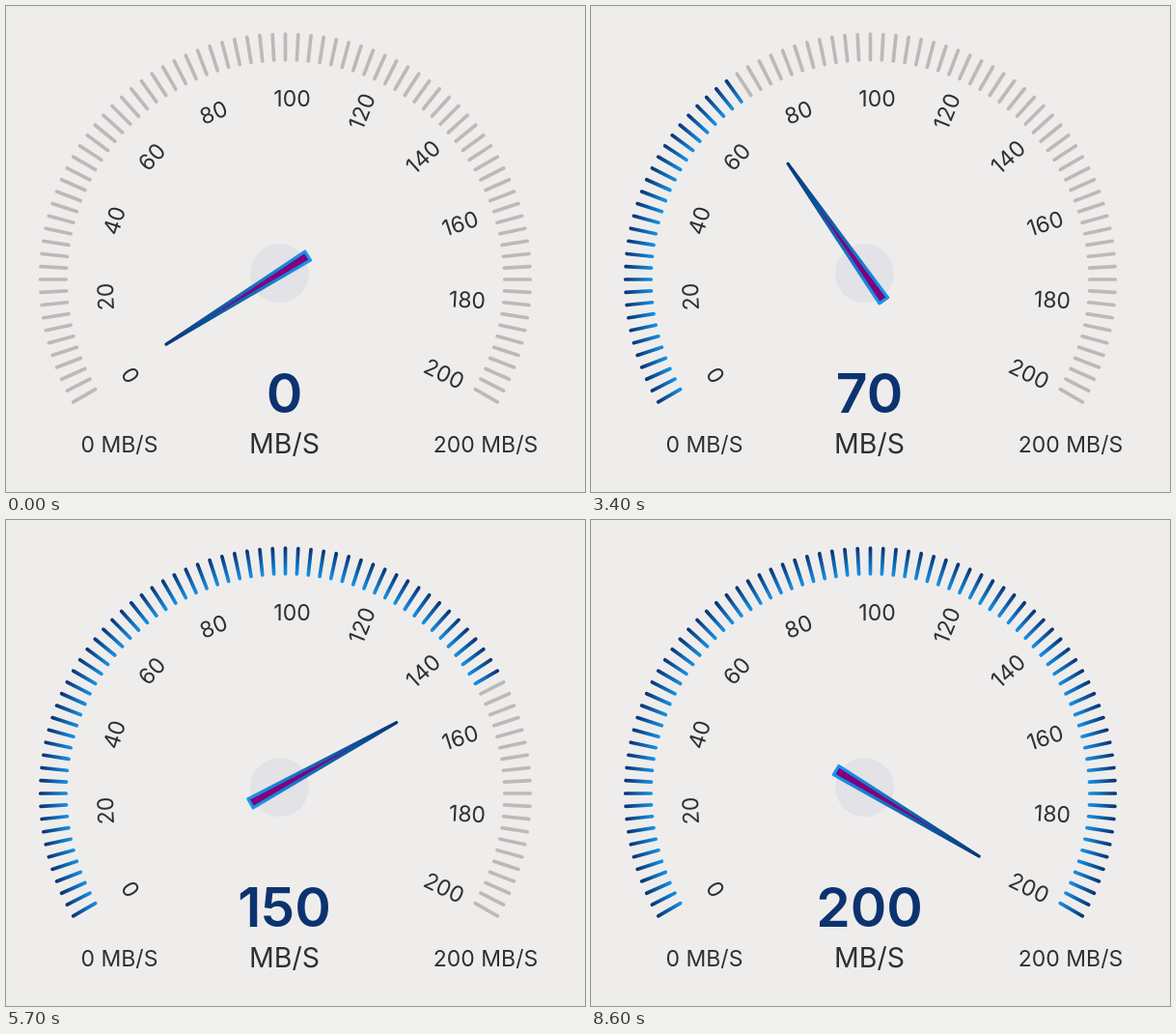
Animation, 600 px wide and 503 px high, one loop 8.7 s. Source, as an HTML page:

```html
<!DOCTYPE html>
<html lang="en">
<head>
<meta charset="utf-8">
<title>Speed gauge</title>
<style>
  html, body { margin: 0; width: 100%; height: 100%; overflow: hidden; background: #efedec; }
  svg { display: block; }
  text { font-family: Inter, Roboto, sans-serif; text-anchor: middle; fill: #303030; }
  .label { font-size: 23px; }
  .unit { font-size: 28.5px; }
  #value { font-size: 57px; font-weight: 600; fill: #0c3370; }
  #ticks line { stroke: #bcbab9; stroke-width: 3.7; stroke-linecap: round; }
  #ticks .on { stroke: url(#tickBlue); }
</style>
</head>
<body>
<svg width="600" height="503" viewBox="0 0 600 503">
  <defs>
    <linearGradient id="tickBlue" gradientUnits="userSpaceOnUse" x1="227" y1="0" x2="254" y2="0">
      <stop offset="0" stop-color="#1590e4"/>
      <stop offset="1" stop-color="#0a3576"/>
    </linearGradient>
    <linearGradient id="needleBlue" gradientUnits="userSpaceOnUse" x1="-139" y1="0" x2="35" y2="0">
      <stop offset="0" stop-color="#0a3576"/>
      <stop offset="1" stop-color="#1598ec"/>
    </linearGradient>
  </defs>
  <g id="ticks" transform="translate(289.5 283)"></g>
  <g id="labels"></g>
  <circle cx="283.5" cy="276.7" r="30.5" fill="#e3e2e6"/>
  <g transform="translate(283.5 276.7)">
    <path id="needle" d="M-138.5 0L34.3 -5.3V5.3Z" fill="#800080"
          stroke="url(#needleBlue)" stroke-width="3.2" stroke-linejoin="round"/>
  </g>
  <text id="value" x="288.5" y="420.5">0</text>
  <text class="unit" x="288.5" y="463">MB/S</text>
  <text class="label" x="117.5" y="462">0 MB/S</text>
  <text class="label" x="497" y="462">200 MB/S</text>
</svg>
<script>
  const NS = 'http://www.w3.org/2000/svg';
  const LOOP = 8700;
  const TICKS = 81;
  const STEP = 10;

  // Time in ms at which each further 10 MB/s is reached
  const jumps = [1500, 1800, 2100, 2500, 2700, 3000, 3200, 3500, 3800, 4100,
                 4500, 4800, 5200, 5400, 5600, 5900, 6100, 7400, 7600, 7900];

  // Dial labels, 20 apart: x, y, rotation
  const places = [
    [129, 382, -122], [103, 301, -93], [112, 222, -72], [151, 156, -48],
    [215, 110, -22], [296.5, 95.5, 0], [368.5, 109, -68], [432, 156, -42],
    [470.5, 225, -18], [478, 304, 3], [454, 380.5, 26]
  ];

  const byId = id => document.getElementById(id);

  function add(parent, tag, attrs) {
    const el = document.createElementNS(NS, tag);
    for (const key in attrs) el.setAttribute(key, attrs[key]);
    return parent.appendChild(el);
  }

  const ticks = Array.from({ length: TICKS }, (_, i) =>
    add(byId('ticks'), 'line', { x1: 227.3, x2: 253.8, transform: `rotate(${i * 3 - 210})` }));

  places.forEach(([x, y, turn], i) => {
    const label = add(byId('labels'), 'text', {
      class: 'label', dy: '.364em', transform: `translate(${x} ${y}) rotate(${turn})`
    });
    label.textContent = i * 20;
  });

  // The needle leads by one tick in the upper part of the range
  const needleAngle = v => v * 1.2 - 32 + (v >= 60 ? 3 : 0);

  let shown = -1;

  function show(value) {
    if (value === shown) return;
    shown = value;
    const last = value / 2.5;
    ticks.forEach((t, i) => t.classList.toggle('on', value > 0 && i <= last));
    byId('needle').setAttribute('transform', `rotate(${needleAngle(value)})`);
    byId('value').textContent = value;
  }

  function frame() {
    const t = performance.now() % LOOP;
    show(STEP * jumps.filter(j => j <= t).length);
    requestAnimationFrame(frame);
  }

  frame();
</script>
</body>
</html>
```
